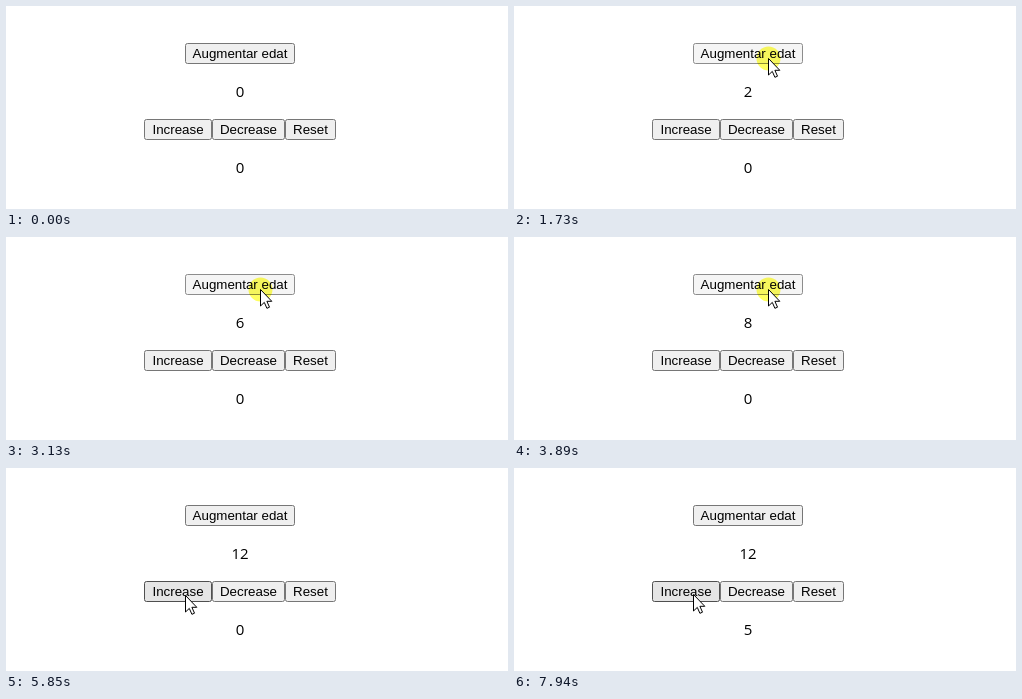
An HTML page for the animation above (8000 ms loop, 502 by 203 pixels).

```html
<!DOCTYPE html>
<html lang="ca">
<head>
<meta charset="utf-8">
<title>Counters</title>
<style>
  html, body { margin: 0; height: 100%; overflow: hidden; background: #fff; }
  svg { display: block; width: 502px; height: 203px; }
  text { text-anchor: middle; }
  .label { font: 13.333px "Liberation Sans", Arial, sans-serif; }
  .count { font: 15px "Open Sans", "Noto Sans", sans-serif; }
  #glow { fill: #ffff60; mix-blend-mode: multiply; }
</style>
</head>
<body>
<svg id="stage" viewBox="0 0 502 203">
  <g id="buttons"></g>
  <text class="count" id="age" x="234" y="91">0</text>
  <text class="count" id="total" x="234" y="167">0</text>
  <circle id="glow" r="12"/>
  <path id="cursor" d="M0 0V16.5L3.8 12.9 6.4 18.8 9 17.7 6.4 11.8H11.3Z" fill="#fff" stroke="#000" stroke-linejoin="round"/>
</svg>
<script>
const LOOP = 8000;
const $ = id => document.getElementById(id);

const buttons = [
  { x: 179, y: 37, w: 110, label: 'Augmentar edat' },
  { x: 138, y: 113, w: 68, label: 'Increase' },
  { x: 206, y: 113, w: 73, label: 'Decrease' },
  { x: 279, y: 113, w: 51, label: 'Reset' }
];
const H = 21;
const looks = {
  idle: ['#efefef', '#767676'],
  hover: ['#e5e5e5', '#4f4f4f'],
  active: ['#f5f5f5', '#8d8d8d']
};

// Press and release times of each click
const ageClicks = [
  [1030, 1130], [1420, 1540], [1730, 1830], [2010, 2150], [2340, 2490], [2670, 2840],
  [3130, 3260], [3530, 3660], [3890, 4040], [4200, 4330], [4560, 4690], [5060, 5170]
];
const totalClicks = [[6540, 6640], [6960, 7040], [7300, 7450], [7630, 7750], [7840, 7940]];
const allClicks = [...ageClicks, ...totalClicks];

function addShape(tag, attrs) {
  const el = document.createElementNS('http://www.w3.org/2000/svg', tag);
  for (const key in attrs) el.setAttribute(key, attrs[key]);
  return $('buttons').appendChild(el);
}

for (const b of buttons) {
  b.rect = addShape('rect', { x: b.x + .5, y: b.y + .5, width: b.w - 1, height: H - 1, rx: 2 });
  addShape('text', { class: 'label', x: b.x + b.w / 2, y: b.y + 15 }).textContent = b.label;
}

function ease(t, start, end) {
  const u = Math.min(1, Math.max(0, (t - start) / (end - start)));
  return u * u * (3 - 2 * u);
}

function bezier(u, a, b, c, d) {
  const v = 1 - u;
  return v * v * v * a + 3 * v * v * u * b + 3 * v * u * u * c + u * u * u * d;
}

function pointer(t) {
  if (t < 5330) {
    const u = ease(t, 100, 930);
    return [bezier(u, 432.5, 350, 270, 254.5), bezier(u, 204.5, 70, 100, 52.5)];
  }
  const u = ease(t, 5310, 5850);
  return [254.5 - 75 * u, 52.5 + 75 * u - (t >= 6180 ? 1 : 0)];
}

const released = (clicks, t) => clicks.filter(c => t >= c[1]).length;

function draw(t) {
  const [x, y] = pointer(t).map(v => Math.floor(v) + .5);
  const pressed = allClicks.some(([down, up]) => t >= down && t < up);

  for (const b of buttons) {
    const over = x > b.x && x < b.x + b.w && y > b.y && y < b.y + H;
    const [fill, stroke] = looks[over ? (pressed ? 'active' : 'hover') : 'idle'];
    b.rect.setAttribute('fill', fill);
    b.rect.setAttribute('stroke', stroke);
  }
  $('age').textContent = released(ageClicks, t);
  $('total').textContent = released(totalClicks, t);

  const place = `translate(${x} ${y})`;
  $('cursor').setAttribute('transform', place);
  $('glow').setAttribute('transform', place);
  $('glow').setAttribute('visibility', pressed ? 'visible' : 'hidden');
}

const start = performance.now();
function tick() {
  draw((performance.now() - start) % LOOP);
  requestAnimationFrame(tick);
}
tick();
</script>
</body>
</html>
```
